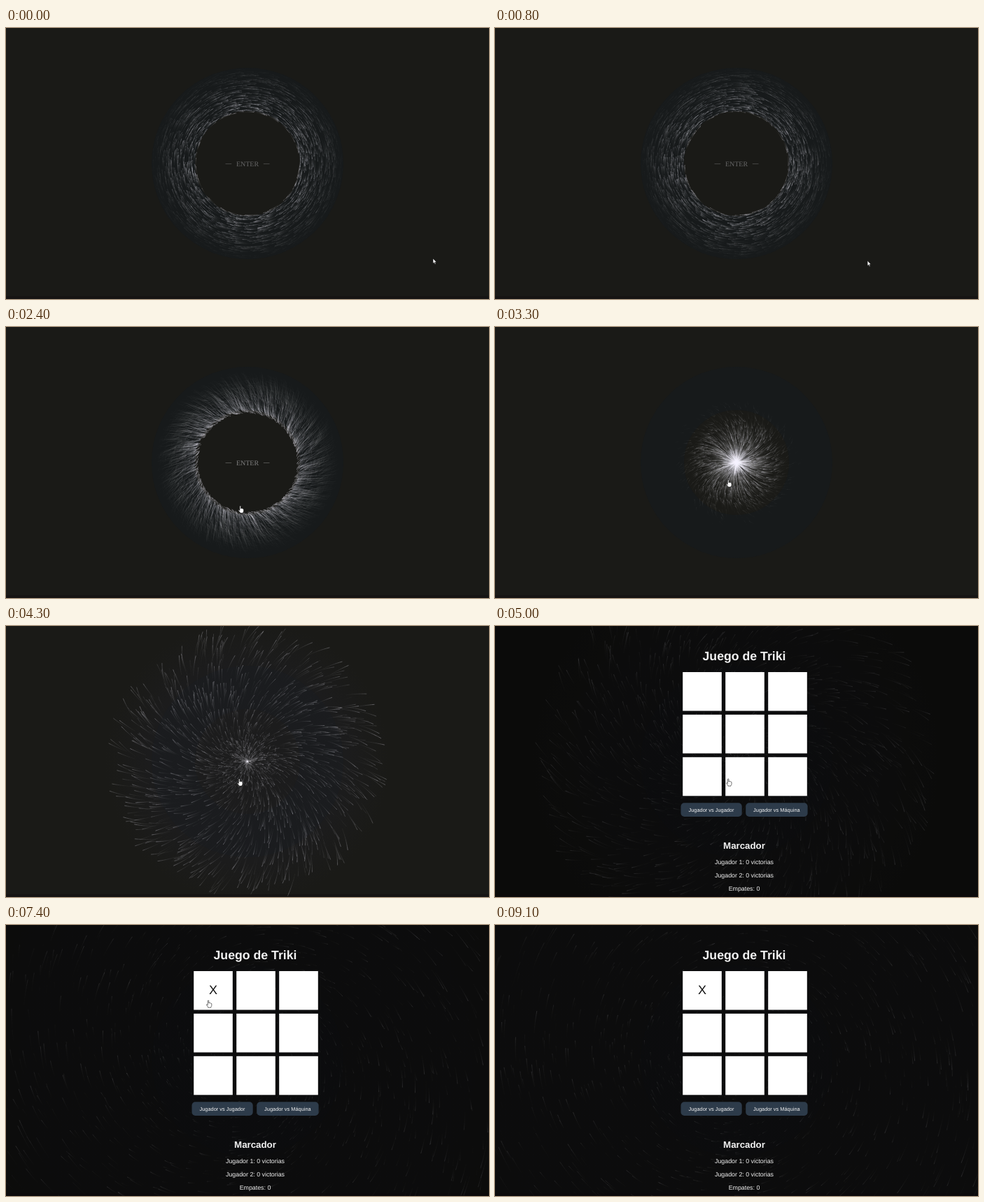
Animation of 690x388 px, one loop 9.2 s. Source, as an HTML page with a canvas:

```html
<!DOCTYPE html>
<html lang="es">
<head>
<meta charset="utf-8">
<title>Juego de Triki</title>
<style>
html, body { margin: 0; width: 100%; height: 100%; overflow: hidden; background: #1a1a17; }
canvas, svg { position: absolute; left: 0; top: 0; width: 690px; height: 388px; display: block; }
text { text-anchor: middle; text-rendering: geometricPrecision; font-family: "Liberation Sans", Arial, sans-serif; }
#enter text { font: 10px "Liberation Serif", "Times New Roman", serif; }
#board { fill: #f2f2f2; font-size: 8.86px; }
#board .title { font-weight: bold; font-size: 17.7px; }
#board .sub { font-weight: bold; font-size: 13.3px; }
.btn rect { fill: #2d3b4a; }
.btn text { font-size: 7.4px; }
#mark { font-size: 18px; fill: #111; }
#cursor path { fill: #fff; stroke: #111; stroke-width: .6; stroke-linejoin: round; }
</style>
</head>
<body>
<canvas id="sky" width="690" height="388"></canvas>
<svg viewBox="0 0 690 388">
  <g id="enter">
    <text x="345" y="198">ENTER</text>
    <rect x="313.5" y="194.4" width="8.7" height=".55"/>
    <rect x="367.8" y="194.4" width="8.7" height=".55"/>
  </g>
  <g id="board">
    <rect width="690" height="388" fill="#000" fill-opacity=".56"/>
    <text class="title" x="356" y="49.3">Juego de Triki</text>
    <g id="cells" fill="#fff"></g>
    <text id="mark" x="296" y="99.4">X</text>
    <g class="btn"><rect x="265.5" y="253.2" width="87.2" height="19.8" rx="5"/><text x="309" y="266">Jugador vs Jugador</text></g>
    <g class="btn"><rect x="358.2" y="253.2" width="88.4" height="19.8" rx="5"/><text x="402.4" y="266">Jugador vs Máquina</text></g>
    <text class="sub" x="356" y="318.6">Marcador</text>
    <text x="356" y="340.8">Jugador 1: 0 victorias</text>
    <text x="356" y="359.8">Jugador 2: 0 victorias</text>
    <text x="356" y="378.9">Empates: 0</text>
  </g>
  <rect y="384" width="690" height="4" fill="#10080a" fill-opacity=".3"/>
  <g id="cursor">
    <path id="arrow" d="M0 0V7.2L1.7 5.7L2.8 8.2L4 7.7L2.9 5.2H5.1Z"/>
    <path id="hand" d="M-.8 .6Q0 -.4 .8 .6V4.2L1.2 3.6Q2 3.2 2.4 4L3 3.9Q3.6 3.8 3.9 4.5Q4.7 4.4 4.8 5.2V7.6Q4.5 9 3.8 9.6V10.4H-.4V9.7L-2.6 6.6Q-2.6 5.6 -1.6 6L-.8 6.8Z"/>
  </g>
</svg>
<script>
const $ = id => document.getElementById(id);
const ctx = $('sky').getContext('2d');
const W = 690, H = 388, CX = 345, CY = 194;
const LOOP = 9.2, HOVER = 2.3, CLICK = 2.92, BOARD = 4.7, MARK = 7.2;
const SCALE = 0.545, ORBIT = 255, STARS = 2500, GROUP = 20;
const TRAIL = 8, STEP = 1 / 45;

let seed = 20177;
function rand() {
  seed = (seed + 0x6D2B79F5) | 0;
  let v = Math.imul(seed ^ (seed >>> 15), 1 | seed);
  v = (v + Math.imul(v ^ (v >>> 7), 61 | v)) ^ v;
  return ((v ^ (v >>> 14)) >>> 0) / 4294967296;
}

const stars = Array.from({ length: STARS }, (_, i) => {
  const orbit = ORBIT * (0.53 + 0.46 * rand());
  return {
    orbit,
    angle: rand() * Math.PI * 2,
    speed: (Math.floor(rand() * 2.5) + 1.5) * 20 * Math.PI / 180,
    near: ORBIT / 2 + Math.max(0, orbit - ORBIT * 0.7),
    far: -10 * (i % 100) + rand() * 20
  };
}).sort((a, b) => b.orbit - a.orbit);

function collapsed(s, t) {
  return s.near + (s.orbit - s.near) * Math.exp(-13.4 * (t - HOVER));
}

function radius(s, t) {
  if (t < HOVER) return s.orbit;
  if (t < CLICK) return collapsed(s, t);
  return s.far + (collapsed(s, CLICK) - s.far) * Math.exp(-0.43 * (t - CLICK));
}

function place(s, t) {
  const r = radius(s, t) * SCALE;
  const a = s.angle + (t + 2) * s.speed * (t < CLICK ? 1 : 0.5);
  return [CX - Math.sin(a) * r, CY + Math.cos(a) * r];
}

// faint residue left where the swarm has passed
function drawResidue(t) {
  ctx.strokeStyle = 'rgba(18,25,34,.4)';
  ctx.lineWidth = 62;
  ctx.beginPath();
  ctx.arc(CX, CY, 106, 0, 7);
  ctx.stroke();
  if (t < CLICK) return;
  const reach = Math.max(1, 540 - 610 * Math.exp(-0.43 * (t - CLICK)));
  const haze = ctx.createRadialGradient(CX, CY, 0, CX, CY, reach);
  haze.addColorStop(0.7, 'rgba(30,30,34,.5)');
  haze.addColorStop(1, 'rgba(30,30,34,0)');
  ctx.fillStyle = haze;
  ctx.fillRect(0, 0, W, H);
}

function drawStars(t) {
  ctx.strokeStyle = '#f4f2ff';
  ctx.lineWidth = 0.66;
  const from = t >= CLICK ? CLICK : -1;
  for (let g = 0; g < STARS; g += GROUP) {
    const group = stars.slice(g, g + GROUP);
    const alpha = 1 - group[0].orbit / ORBIT;
    let heads = group.map(s => place(s, t));
    for (let k = 0; k < TRAIL; k++) {
      const past = t - (k + 1) * STEP;
      if (past < from) break;
      const tails = group.map(s => place(s, past));
      ctx.globalAlpha = alpha * Math.pow(0.8, k * STEP * 60);
      ctx.beginPath();
      heads.forEach((p, i) => {
        ctx.moveTo(p[0], p[1]);
        ctx.lineTo(tails[i][0], tails[i][1]);
      });
      ctx.stroke();
      heads = tails;
    }
  }
  ctx.globalAlpha = 1;
}

// time, x, y of the pointer tip
const route = [
  [0, 610, 330], [0.3, 610, 330], [1, 513, 334], [1.5, 336.5, 305], [2, 337, 298],
  [2.3, 335, 263], [2.7, 333.2, 218.7], [5.4, 333.2, 218.7], [5.9, 309, 262],
  [6.3, 309, 262], [7, 289, 107.8], [8, 289, 107.8], [8.6, 200, 400], [9.2, 200, 400]
];

function pointer(t) {
  const i = route.findIndex(p => p[0] > t);
  const a = route[i - 1], b = route[i];
  const u = (t - a[0]) / (b[0] - a[0]), e = u * u * (3 - 2 * u);
  return [a[1] + (b[1] - a[1]) * e, a[2] + (b[2] - a[2]) * e];
}

function clickable(x, y, t) {
  if (t < BOARD) return Math.hypot(x - CX, y - CY) < 70;
  return x > 265 && x < 447 && ((y > 66 && y < 244) || (y > 253 && y < 273));
}

function show(id, on) {
  $(id).style.display = on ? '' : 'none';
}

const clamp = v => Math.min(1, Math.max(0, v));

function frame(now) {
  const t = (now / 1000) % LOOP;
  ctx.fillStyle = '#1a1a17';
  ctx.fillRect(0, 0, W, H);
  drawResidue(t);
  drawStars(t);

  const lit = Math.round(102 + 119 * clamp((t - HOVER) / 0.5));
  $('enter').setAttribute('fill', `rgb(${lit},${lit},${lit})`);
  $('enter').setAttribute('opacity', 1 - clamp((t - CLICK) / 0.35));

  show('board', t >= BOARD);
  show('mark', t >= MARK);

  const [x, y] = pointer(t), hand = clickable(x, y, t);
  $('cursor').setAttribute('transform', `translate(${x} ${y})`);
  show('hand', hand);
  show('arrow', !hand);
  requestAnimationFrame(frame);
}

for (let i = 0; i < 9; i++) {
  const cell = document.createElementNS('http://www.w3.org/2000/svg', 'rect');
  const box = { x: 268.2 + 61 * (i % 3), y: 66 + 60.9 * Math.floor(i / 3), width: 55.6, height: 55.5 };
  for (const k in box) cell.setAttribute(k, box[k]);
  $('cells').append(cell);
}
requestAnimationFrame(frame);
</script>
</body>
</html>
```
